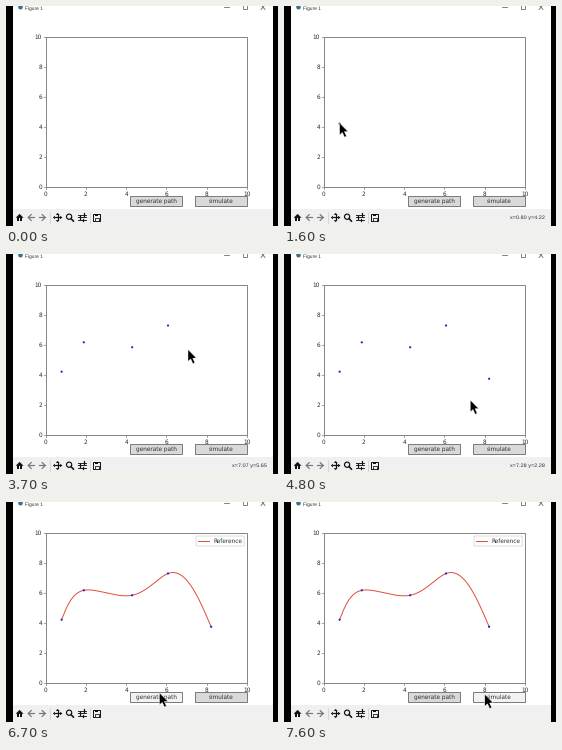
A matplotlib script that plays this animation: 272 by 220 pixels, repeating every 8000 ms.

```python
import numpy as np
import matplotlib.pyplot as plt
from matplotlib.animation import FuncAnimation
from matplotlib.patches import Circle, FancyBboxPatch, Polygon, Rectangle

W, H, DPI = 272, 220, 100
FRAMES, STEP = 80, 100
PT = 72 / DPI

LEFT, RIGHT, TOP, BOTTOM = 39.5, 241.0, 31.0, 181.0
INK, SOFT, FRAME = "#111111", "#2c2c2c", "#868686"
BAR, IDLE, HOVER = "#f0f0f0", "#d9d9d9", "#f2f2f2"
BTN_TOP, BTN_BOTTOM = 190.5, 200.5

# clicked points in data units
POINTS = np.array([(0.8, 4.22), (1.9, 6.18), (4.3, 5.85), (6.08, 7.3), (8.22, 3.75)])
CLICK_DELAY, PATH_FRAME = 2, 61

# cursor stops in pixels; each leg has first frame, last frame, easing power
ENTRY, GENERATE, SIMULATE = (14, 206), (148, 191.4), (200.8, 193)
LEGS = [(6, 14, 0.5), (17, 20, 0.7), (24, 26, 0.3), (30, 32, 0.7), (36, 39, 0.7),
        (47, 51, 0.8), (65, 74, 1.5)]
ARROW = np.array([(0, 0), (0, 12), (2.7, 9.5), (4.9, 14.2), (6.9, 13.3),
                  (4.8, 8.7), (8.4, 8.5)]) - (0, 0.7)


def to_px(xy):
    xy = np.asarray(xy, float)
    return np.column_stack([LEFT + xy[:, 0] * (RIGHT - LEFT) / 10,
                            BOTTOM - xy[:, 1] * (BOTTOM - TOP) / 10])


STOPS = np.vstack([ENTRY, to_px(POINTS), GENERATE, SIMULATE])


def cursor_at(i):
    pos = STOPS[0]
    for (first, last, power), goal in zip(LEGS, STOPS[1:]):
        u = np.clip((i - first) / (last - first), 0, 1)
        pos = pos + (goal - pos) * u**power
    return pos


def natural_spline(s, v, t):
    """Natural cubic spline through (s, v), sampled at t."""
    n, h = len(s), np.diff(s)
    a, b = np.eye(n), np.zeros(n)
    for i in range(1, n - 1):
        a[i, i - 1:i + 2] = h[i - 1], 2 * (h[i - 1] + h[i]), h[i]
        b[i] = 6 * ((v[i + 1] - v[i]) / h[i] - (v[i] - v[i - 1]) / h[i - 1])
    m = np.linalg.solve(a, b)
    k = np.clip(np.searchsorted(s, t, side="right") - 1, 0, n - 2)
    p, q = s[k + 1] - t, t - s[k]
    return ((m[k] * p**3 + m[k + 1] * q**3) / (6 * h[k])
            + (v[k] / h[k] - m[k] * h[k] / 6) * p
            + (v[k + 1] / h[k] - m[k + 1] * h[k] / 6) * q)


plt.rcParams["toolbar"] = "None"
plt.rcParams["text.hinting"] = "none"
fig = plt.figure(figsize=(W / DPI, H / DPI), dpi=DPI, facecolor="black")
ax = fig.add_axes([0, 0, 1, 1])
ax.set_xlim(0, W)
ax.set_ylim(H, 0)
ax.axis("off")


def rect(x0, y0, x1, y1, fc="none", ec="none", lw=0.0, z=1):
    return ax.add_patch(Rectangle((x0, y0), x1 - x0, y1 - y0, fc=fc, ec=ec,
                                  lw=lw * PT, zorder=z))


def ring(x, y, r, fc="none", ec="none", lw=0.0, z=3):
    return ax.add_patch(Circle((x, y), r, fc=fc, ec=ec, lw=lw * PT, zorder=z))


def line(xs, ys, color=INK, lw=1.0, z=3):
    return ax.plot(xs, ys, color=color, lw=lw * PT, zorder=z)[0]


def text(x, y, s, size=5.76, font="DejaVu Sans", ha="center", z=4):
    return ax.text(x, y, s, fontsize=size * PT, family=font, ha=ha,
                   va="baseline", color=SOFT, zorder=z)


def shape(pts, color=INK, z=3):
    return ax.add_patch(Polygon(pts, closed=True, fc=color, ec="none", zorder=z))


def draw_window():
    rect(7, 0, 267, H, "white")
    rect(7, 203, 267, H, BAR)
    ring(14.5, 1.2, 2.3, fc="#3d6f8e")
    text(19, 3.7, "Figure 1", 4.9, "Liberation Sans", ha="left")
    line([218, 222.5], [1.5, 1.5], "#666666", 0.8)
    rect(236.5, -0.5, 240.5, 3.5, ec="#666666", lw=0.8, z=3)
    for ys in ([-1, 3.5], [3.5, -1]):
        line([255, 259], ys, "#666666", 0.8)


def draw_axes():
    rect(LEFT, TOP, RIGHT, BOTTOM, ec=FRAME, lw=1, z=3)
    for v in range(0, 11, 2):
        x, y = to_px([(v, v)])[0]
        line([x, x], [BOTTOM, BOTTOM + 2], FRAME, 0.8)
        line([LEFT - 2, LEFT], [y, y], FRAME, 0.8)
        text(x, 189.8, str(v))
        text(LEFT - 3.6, y + 2.1, str(v), ha="right")


def home_icon(x, y):
    shape([(x - 4, y + 0.3), (x, y - 3.6), (x + 4, y + 0.3)])
    for side in (-1, 1):
        rect(x + side * 0.8, y, x + side * 2.8, y + 3.4, INK, z=3)
    rect(x - 2.8, y, x + 2.8, y + 1, INK, z=3)


def arrow_icon(x, y, d):
    line([x - 3.2 * d, x + 3 * d], [y, y], "#777777", 1.2)
    line([x, x + 3 * d, x], [y - 2.9, y, y + 2.9], "#777777", 1.2)


def move_icon(x, y):
    for dx, dy in ((1, 0), (-1, 0), (0, 1), (0, -1)):
        line([x, x + 3 * dx], [y, y + 3 * dy], lw=1.2)
        out, across = np.array([dx, dy]), np.array([dy, dx])
        base = (x, y) + 2.6 * out
        shape([base + 2 * out, base + 1.8 * across, base - 1.8 * across])


def zoom_icon(x, y):
    ring(x - 0.7, y - 0.8, 2.6, ec=INK, lw=1.2)
    line([x + 1.2, x + 3.6], [y + 1.1, y + 3.6], lw=1.6)


def sliders_icon(x, y):
    for k, knob in zip((-1, 0, 1), (2, -2, 0.8)):
        line([x - 4, x + 4], [y + 2.8 * k, y + 2.8 * k], lw=0.9)
        line([x + knob, x + knob], [y + 2.8 * k - 1.2, y + 2.8 * k + 1.2], lw=1.2)


def save_icon(x, y):
    rect(x - 3.5, y - 3.5, x + 3.5, y + 3.5, BAR, INK, 1, z=3)
    rect(x - 2, y - 3.5, x + 1.5, y - 1.2, INK, z=4)
    rect(x - 2, y + 0.8, x + 2, y + 3.5, BAR, INK, 0.8, z=4)


def draw_toolbar(y=211.5):
    home_icon(13.6, y)
    arrow_icon(25.2, y, -1)
    arrow_icon(36.2, y, 1)
    move_icon(51.5, y)
    zoom_icon(63.8, y)
    sliders_icon(75.7, y)
    save_icon(90.5, y)
    for x in (43.5, 83.5):
        line([x, x], [206, 217], "#d0d0d0", 0.8)


def button(x0, x1, label):
    face = rect(x0, BTN_TOP, x1, BTN_BOTTOM, IDLE, "#7c7c7c", 1, z=2)
    text((x0 + x1) / 2, 197, label)
    return x0, x1, face


def draw_path():
    s = np.r_[0, np.cumsum(np.hypot(*np.diff(POINTS, axis=0).T))]
    t = np.linspace(0, s[-1], 200)
    xy = to_px(np.column_stack([natural_spline(s, POINTS[:, k], t) for k in (0, 1)]))
    red = "#e2503c"
    box = FancyBboxPatch((190, 34), 48.2, 10, boxstyle="round,pad=0,rounding_size=1",
                         fc="white", ec="#d4d4d4", lw=0.8 * PT, zorder=4)
    return [line(*xy.T, red, 1.0, z=4), ax.add_patch(box),
            line([191.8, 203], [39, 39], red, 1.0, z=5),
            text(207.3, 40.9, "Reference", ha="left", z=5)]


draw_window()
draw_axes()
draw_toolbar()
buttons = [button(124, 176, "generate path"), button(189, 241, "simulate")]
path_parts = draw_path()
dots = [ring(x, y, 1.1, fc="#2424d0", z=5) for x, y in to_px(POINTS)]
status = text(261, 213.3, "", 5.5, "Liberation Sans", ha="right")
cursor = ax.add_patch(Polygon(ARROW, closed=True, fc="black", ec="white",
                              lw=0.4 * PT, zorder=9))


def draw(i):
    x, y = cursor_at(i)
    shown = i >= LEGS[0][0]
    cursor.set_visible(shown)
    cursor.set_xy(ARROW + (x, y))

    inside = shown and LEFT <= x <= RIGHT and TOP <= y <= BOTTOM
    dx = (x - LEFT) / (RIGHT - LEFT) * 10
    dy = (BOTTOM - y) / (BOTTOM - TOP) * 10
    status.set_text(f"x={dx:.2f} y={dy:.2f}" if inside else "")

    for x0, x1, face in buttons:
        over = shown and x0 <= x <= x1 and BTN_TOP <= y <= BTN_BOTTOM
        face.set_facecolor(HOVER if over else IDLE)
    for dot, (_, last, _) in zip(dots, LEGS):
        dot.set_visible(i >= last + CLICK_DELAY)
    for part in path_parts:
        part.set_visible(i >= PATH_FRAME)
    return [cursor, status, *dots, *path_parts, *(b[2] for b in buttons)]


anim = FuncAnimation(fig, draw, frames=FRAMES, interval=STEP, repeat=True,
                     repeat_delay=0, blit=False)
plt.show()
```
